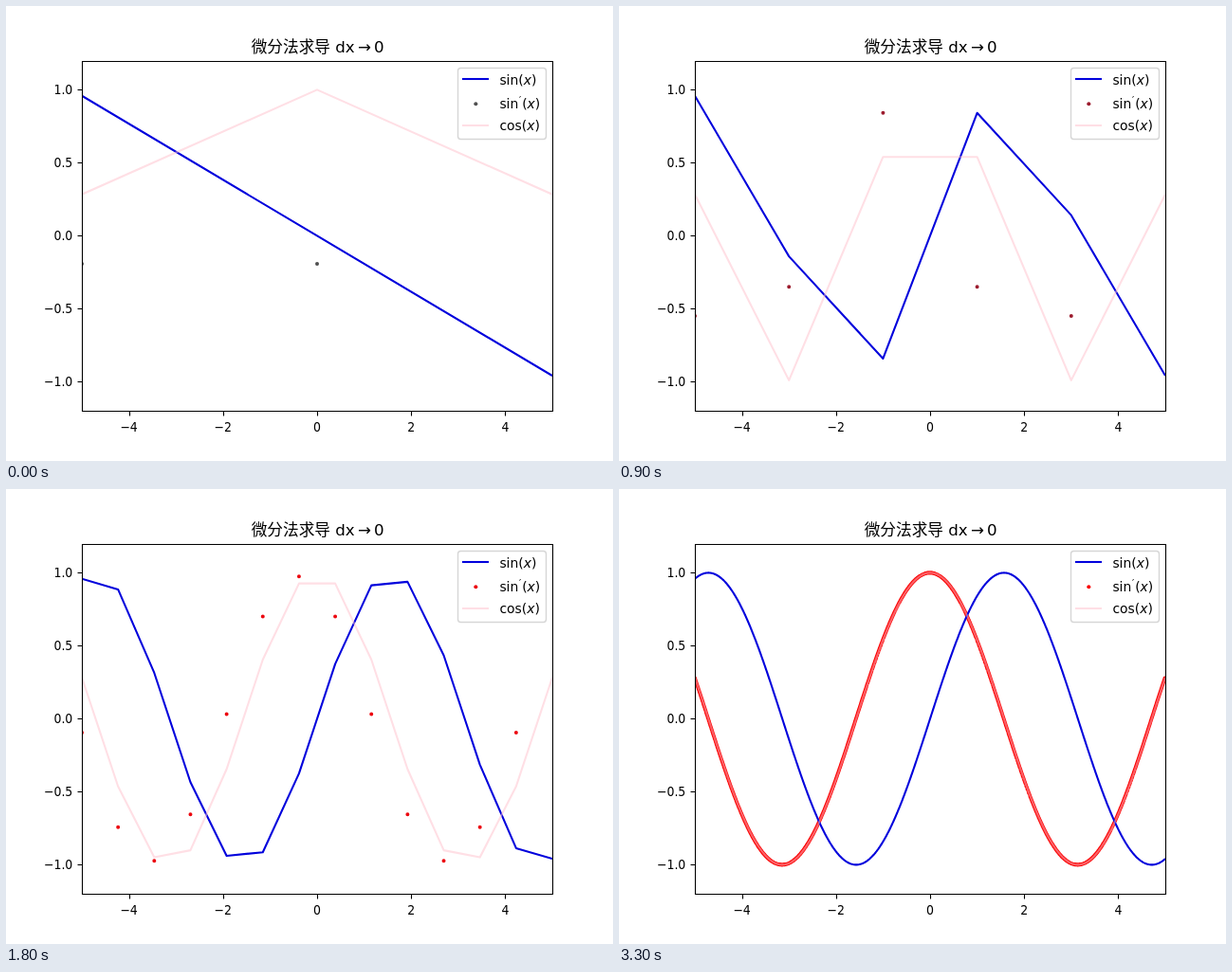
An HTML page that plays this animation: 640 px wide and 480 px high, repeating every 3600 ms.

```html
<!DOCTYPE html>
<html lang="zh-CN">
<head>
<meta charset="utf-8">
<title>dx → 0</title>
<style>
  html, body { margin: 0; width: 100%; height: 100%; overflow: hidden; background: #fff; }
  svg { display: block; width: 640px; height: 480px; }
  text { font: 13.89px "DejaVu Sans", sans-serif; white-space: pre; }
  .tick { font-family: "DejaVu Sans Condensed", "Noto Sans", sans-serif; }
  .title { font-size: 16.67px; }
  .han { font-family: "Noto Sans CJK SC", "Noto Sans CJK", sans-serif; }
  .var { font-style: italic; }
  .prime { font-size: 9.7px; }
  .line { fill: none; stroke-width: 2.08; stroke-linejoin: round; }
  .sin { stroke: #0000dc; }
  .cos { stroke: #ffc0cb; stroke-opacity: .5; }
  .dots { fill: none; stroke-width: 4; stroke-linecap: round; }
  .axis { fill: none; stroke: #000; stroke-width: 1.1; }
</style>
</head>
<body>
<svg viewBox="0 0 640 480">
  <clipPath id="plot"><rect x="80" y="57.6" width="496" height="369.6"/></clipPath>
  <g clip-path="url(#plot)">
    <path id="slope" class="dots"/>
    <path id="sine" class="line sin"/>
    <path id="cosine" class="line cos"/>
  </g>
  <g id="axes"><path class="axis" d="M80.5 58.5H576.5V427.5H80.5Z"/></g>

  <text class="title han" x="258.7" y="49">微分法求导</text>
  <text class="title" x="347.3" y="49">dx</text>
  <text class="title" x="370.9" y="49">→</text>
  <text class="title" x="388" y="49">0</text>

  <rect x="476.5" y="65.5" width="93" height="75" rx="3" fill="#fff" fill-opacity=".8" stroke="#ccc" stroke-opacity=".8" stroke-width="1.39"/>
  <path class="line sin" d="M481 77H509"/>
  <path id="key" class="dots" d="M495.3 103.3h0.01"/>
  <path class="line cos" d="M481 126H509"/>
  <text x="520.4" y="82.5">sin(<tspan class="var">x</tspan>)</text>
  <text x="520.4" y="107.5">sin</text>
  <text class="prime" x="541" y="102.5">′</text>
  <text x="544.2" y="107.5">(<tspan class="var">x</tspan>)</text>
  <text x="520.4" y="131">cos(<tspan class="var">x</tspan>)</text>
</svg>
<script>
const STEP = 300;
const counts = [3, 4, 5, 6, 8, 10, 14, 20, 34, 50, 100, 1000];
const dotColors = ['#505050', '#603840', '#7a2430', '#9c1c2e', '#c0142c', '#d81020',
  '#ec0810', '#f00808', '#f40606', '#f80404', '#fc0202', '#fa0404'];

const byId = id => document.getElementById(id);
const px = x => 328 + x * 49.6;
const py = y => 242.4 - y * 154;
const point = (x, y) => `${px(x).toFixed(2)} ${py(y).toFixed(2)}`;
const polyline = (xs, fn) => 'M' + xs.map(x => point(x, fn(x))).join('L');

function add(tag, attrs, label = '') {
  const node = document.createElementNS('http://www.w3.org/2000/svg', tag);
  for (const name in attrs) node.setAttribute(name, attrs[name]);
  node.textContent = label;
  byId('axes').append(node);
}

const signed = (value, digits) => value.toFixed(digits).replace('-', '−');

for (let v = -4; v <= 4; v += 2) {
  add('path', { class: 'axis', d: `M${Math.round(px(v)) + .5} 427.5v5` });
  add('text', { class: 'tick', x: px(v), y: 448.5, 'text-anchor': 'middle' }, signed(v, 0));
}
for (let v = -1; v <= 1; v += .5) {
  add('path', { class: 'axis', d: `M80.5 ${Math.round(py(v)) + .5}h-5` });
  add('text', { class: 'tick', x: 70.3, y: py(v) + 5, 'text-anchor': 'end' }, signed(v, 1));
}

function draw(step) {
  const n = counts[step];
  const dx = 10 / (n - 1);
  const xs = Array.from({ length: n }, (_, i) => -5 + i * dx);
  const slope = x => (Math.sin(x + dx) - Math.sin(x)) / dx;
  byId('sine').setAttribute('d', polyline(xs, Math.sin));
  byId('cosine').setAttribute('d', polyline(xs, Math.cos));
  byId('slope').setAttribute('d', xs.slice(0, -1).map(x => `M${point(x, slope(x))}h0.01`).join(''));
  for (const id of ['slope', 'key']) byId(id).setAttribute('stroke', dotColors[step]);
}

let shown = -1;
function tick() {
  const step = Math.floor(performance.now() / STEP) % counts.length;
  if (step !== shown) draw(shown = step);
  requestAnimationFrame(tick);
}
draw(shown = 0);
requestAnimationFrame(tick);
</script>
</body>
</html>
```
